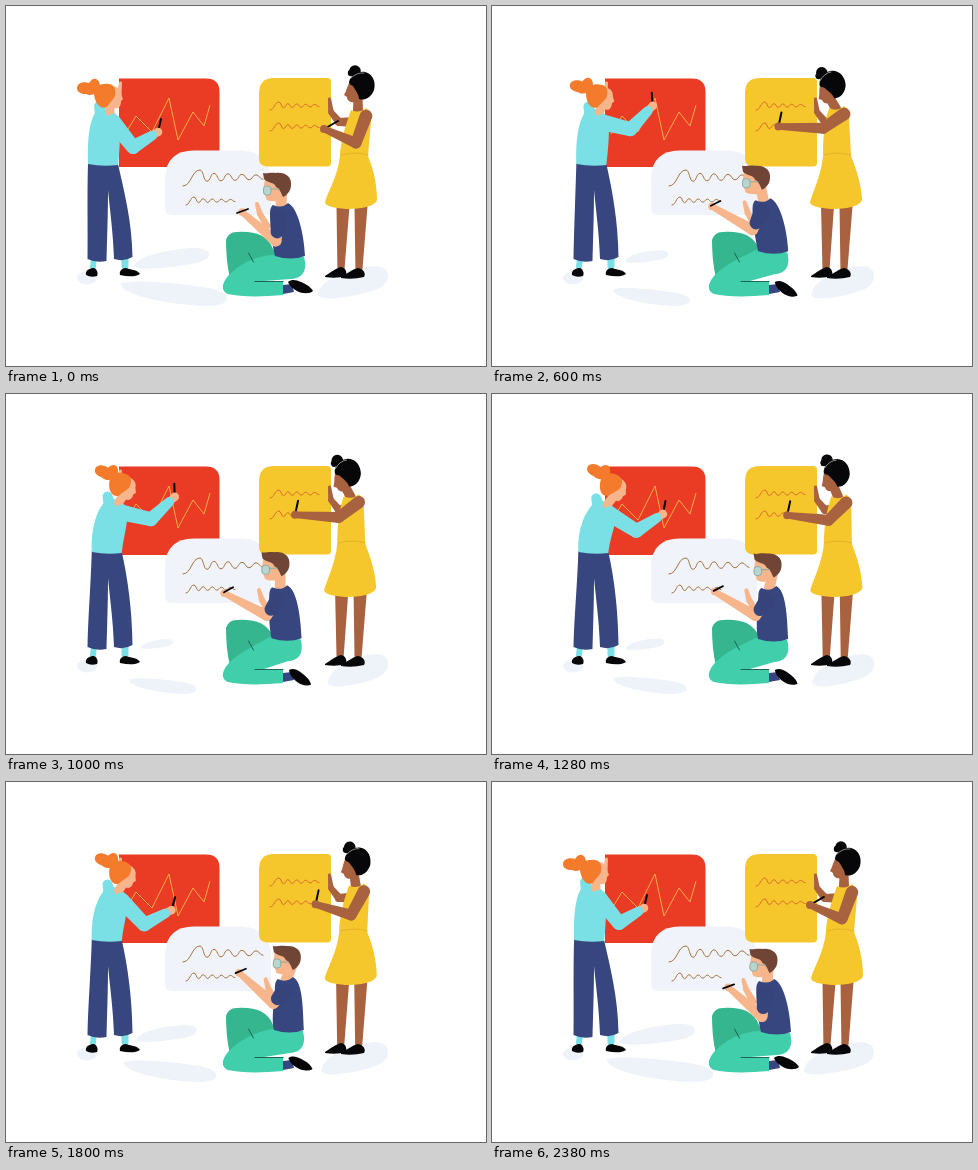
Write an HTML page that moves like this. It is 480x360 px and loops after 2400 ms.

```html
<!DOCTYPE html>
<html lang="en">
<head>
<meta charset="utf-8">
<title>Team at the boards</title>
<style>
html, body { margin: 0; width: 100%; height: 100%; overflow: hidden; background: #fff; }
svg { display: block; width: 480px; height: 360px; }
</style>
</head>
<body>
<svg viewBox="0 0 480 360" width="480" height="360">
  <g id="floor"></g>
  <path fill="#ea3b25" d="M113 72.500H200Q213.500 72.500 213.500 86V161H113Z"/>
  <path fill="#f0f4fa" d="M159 202V172Q160 144.500 188 144.500H237Q262 146 265 172V209H166Q159 209 159 202Z"/>
  <path fill="#f6c72c" d="M253 87Q253 72 268 72H321Q325 72 325 76V157Q325 160.500 321 160.500H261Q253 160 253 153Z"/>
  <path fill="none" stroke="#f3ae45" stroke-linejoin="round" d="M119 128L130 110L146 126L163 92L172 134L187 106L198 120L204 99"/>
  <g id="notes"></g>
  <g id="people"></g>
</svg>
<script>
const LOOP = 2400, STEP = 20;
const SKIN = '#f7b58c', BROWN = '#a8623f', NAVY = '#37467e', CYAN = '#7be0e6',
      GOLD = '#f6c72c', ORANGE = '#f47a2c', BLACK = '#070608', SHADE = '#eef2f9';

// eased 0 to 1 at the peak time, then back to 0 at the end of the loop
function swing(t, peak) {
  const u = t < peak ? t / peak : (LOOP - t) / (LOOP - peak);
  return (1 - Math.cos(Math.PI * u)) / 2;
}
const angle = t => 2 * Math.PI * t / LOOP;

const num = v => +v.toFixed(2);
const off = (p, x, y) => [p[0] + x, p[1] + y];
const mix = (a, b, u) => [a[0] + (b[0] - a[0]) * u, a[1] + (b[1] - a[1]) * u];
const shape = (d, fill) => `<path d="${d}" fill="${fill}"/>`;
const stroke = (d, color, w) =>
  `<path d="${d}" fill="none" stroke="${color}" stroke-width="${w}" stroke-linecap="round"/>`;
const rod = (a, b, w = 2) => stroke(`M${a.map(num)}L${b.map(num)}`, BLACK, w);
const dot = (p, r, fill) => `<circle cx="${num(p[0])}" cy="${num(p[1])}" r="${r}" fill="${fill}"/>`;
const turn = (x, y, deg, cx, cy, body) =>
  `<g transform="translate(${num(x)} ${num(y)}) rotate(${num(deg)} ${cx} ${cy})">${body}</g>`;

// path text with points measured from an anchor
const rel = (o, x, y) => `${num(o[0] + x)} ${num(o[1] + y)}`;

// tapered capsule
function limb(a, ra, b, rb, fill) {
  const dx = b[0] - a[0], dy = b[1] - a[1], len = Math.hypot(dx, dy) || 1;
  const nx = -dy / len, ny = dx / len;
  return shape(`M${rel(a, nx * ra, ny * ra)}L${rel(b, nx * rb, ny * rb)}` +
    `A${rb} ${rb} 0 0 0 ${rel(b, -nx * rb, -ny * rb)}L${rel(a, -nx * ra, -ny * ra)}` +
    `A${ra} ${ra} 0 0 0 ${rel(a, nx * ra, ny * ra)}Z`, fill);
}

// handwriting: one tall stroke, then shrinking waves
function scribble(x, y, end, rise, height, waves, color) {
  const step = (end - x - rise) / waves, mid = y - height * .55;
  let d = `M${x} ${y}`, py = y;
  for (let i = 0; i <= waves; i++) {
    const w = i ? step : rise;
    const ny = i ? mid + (i % 2 ? 1 : -1) * height * .27 * (1 - .5 * i / waves) : y - height;
    d += `C${num(x + w / 2)} ${num(py)} ${num(x + w / 2)} ${num(ny)} ${num(x + w)} ${num(ny)}`;
    x += w;
    py = ny;
  }
  return stroke(d, color, 1);
}

function blob(x0, x1, y0, y1, rising) {
  const q = (x, y) => `${num(x0 + (x1 - x0) * x)} ${num(y0 + (y1 - y0) * (rising ? y : 1 - y))}`;
  return shape(`M${q(0, .9)}C${q(-.02, .5)} ${q(.4, .05)} ${q(.8, 0)}` +
    `C${q(1.06, 0)} ${q(1.06, .5)} ${q(.85, .7)}C${q(.6, .9)} ${q(.1, 1.1)} ${q(0, .9)}Z`, SHADE);
}

function drawFloor(t) {
  const k = swing(t, 900);
  return `<ellipse cx="81" cy="272" rx="10" ry="6.500" fill="${SHADE}"/>` +
    blob(128 + 7 * k, 203 - 36 * k, 242 + 3 * k, 263 - 8 * k, true) +
    blob(115 + 8 * k, 221 - 31 * k, 275 + 9 * k, 300, false) +
    blob(312 + 10 * k, 382, 260, 293, true);
}

function drawPainter(t) {
  const s = swing(t, 1500) ** 1.2;
  const lift = t < 1560 ? Math.sin(Math.PI * t / 1560) ** 2 : 0;
  const h = [101 + 20 * s, 91 + 2 * s], c = [98 + 12 * s, 105 + 5 * s * s];
  const e = [127 + 16 * s + 8 * lift, 141 + 2 * s - 21 * lift];
  const hand = [152 + 19 * s + 4 * lift, 126 + 3 * s - 31 * lift];
  const wrist = mix(hand, e, .22), w = 4.5 * Math.sqrt(s);
  const l = num(82 + w), r = num(112 + w);
  return limb([88, 252], 3, [87, 261], 3, CYAN) + limb([119, 250], 3.5, [119, 260], 3.5, CYAN) +
    shape('M80 269C79 264 84 262 88 262C92 264 92 268 91 270Q85 272 80 269Z', BLACK) +
    shape('M114 269C113 265 116 262 120 262C126 264 132 264 134 268Q128 272 114 269Z', BLACK) +
    shape(`M${l} 157L${r} 158C${num(112 + w + 6)} 185 126 215 126.500 251Q118 256 108 253` +
      `C107 225 104 205 102 184C102 210 101 235 100.500 255Q90 257 81.500 253C82 225 ${num(81 + w)} 190 ${l} 157Z`, NAVY) +
    limb([113, 90], 2.5, [114.5, 77], 1.5, SKIN) +
    limb(off(c, -3, 3), 6, off(c, -5, -5), 5, CYAN) +
    shape(`M${rel(c, -6, -2)}C${rel(c, -14, 6)} ${num(81 + w)} 130 ${l} 158Q${num(97 + w)} 161 ${r} 159` +
      `C${num(114 + w)} 140 ${rel(c, 17, 18)} ${rel(c, 14, 6)}C${rel(c, 10, 0)} ${rel(c, 4, -4)} ${rel(c, -6, -2)}Z`, CYAN) +
    limb(off(h, 3, 8), 4.5, off(c, 6, 1), 4.5, SKIN) +
    turn(h[0] - 101, h[1] - 91, 24 * s, 101, 91,
      shape('M103 80C110 79 115 83 115 88L117 93L115 95C115 100 113 103 109 102C104 101 99 95 100 88Z', SKIN) +
      shape('M88 88C88 80 96 77 103 78C109 79 110 84 109 90C107 94 104 96 101 101C94 104 89 97 88 88Z', ORANGE) +
      shape('M71 82C71 77 78 75 83 77C87 70 93 72 94 79L95 86C89 86 87 91 80 88C75 88 71 86 71 82Z', ORANGE)) +
    rod(hand, off(hand, 3 - 5 * lift + s, -13)) +
    limb(wrist, 3.5, hand, 4.3, SKIN) +
    limb(off(c, 9, 11), 8, e, 7, CYAN) + limb(e, 7, wrist, 4.8, CYAN);
}

function drawWriter(t) {
  const s = swing(t, 650), flick = Math.max(0, Math.cos(angle(t))) ** 3;
  const h = [356 - 15.5 * s, 79 - s], c = [354 - 8 * s, 103 - 2 * s];
  const e = [350 - 19 * s, 137 - 15 * s], hand = [318 - 32 * s, 123 - 2.5 * s];
  const x = v => num(v - 3 * s), f = v => num(v - s);
  return limb([337 - 1.5 * s, 200], 6.5, [335 - s, 262], 3.6, BROWN) +
    limb([355 - s, 200], 6.5, [353 - s, 262], 3.6, BROWN) +
    shape('M319 270C324 267 330 262 335 261C340 262 341 266 340 270Q330 273 319 271Z', BLACK) +
    shape('M335 271C342 267 347 263 352 262C358 263 360 268 358 271Q346 274 335 272Z', BLACK) +
    limb([323.5, 93], 1.6, [325, 106], 2.8, BROWN) + limb([325, 106], 3, [333, 116], 4, BROWN) +
    limb([333, 116], 4, off(c, -6, 13), 5, BROWN) +
    limb(off(h, -4, 12), 4.5, off(c, -2, 2), 5, BROWN) +
    shape(`M${rel(c, -9, 1)}Q${rel(c, -1, 5)} ${rel(c, 6, -1)}Q${rel(c, 11, 2)} ${rel(c, 11, 12)}L${x(362)} 150` +
      `C${x(370)} 170 ${f(371)} 185 ${f(371)} 194C${f(368)} 202 ${f(350)} 203 ${f(340)} 203` +
      `C${f(328)} 202 ${f(319)} 200 ${f(319)} 196C${f(322)} 185 ${x(332)} 170 ${x(334)} 150` +
      `C${x(334)} 138 ${rel(c, -15, 18)} ${rel(c, -9, 1)}Z`, GOLD) +
    stroke(`M${x(335)} 149Q${x(348)} 145 ${x(362)} 149`, '#e3ad25', .8) +
    turn(h[0] - 356, h[1] - 79, -18 * s, 356, 79,
      shape('M346 72C342 78 341 82 340 85L338 89L341 91C341 95 345 97 349 96C355 95 358 90 358 84Z', BROWN) +
      dot([349, 65], 5.8, BLACK) + dot([345, 67], 3.2, BLACK) +
      shape('M343 76C345 68 353 65 359 66C367 68 370 76 368 84C365 92 358 95 353 93C353 88 349 84 347 80C345 79 343 78 343 76Z', BLACK) +
      stroke('M345 72Q351 66 358 67', '#bdb3ac', .7)) +
    rod(hand, off(hand, 3 + 11 * flick, -14 + 6 * flick)) +
    limb(off(c, 6, 7), 6.3, e, 5.5, BROWN) + limb(e, 5.5, hand, 3.2, BROWN) + dot(hand, 4, BROWN);
}

function drawSitter(t) {
  const up = swing(t, 850), sway = -Math.sin(angle(t)), back = Math.max(0, sway);
  const head = [8.4 * sway + 2.8 * swing(t, LOOP / 2), -9 * up];
  const c = [276 + head[0] / 2, 200 - 6 * up], hip = [-3.5 * up, -6 * up];
  const e = [270 - 8 * up + 3 * sway - 3 * back, 235 - 14 * up - 9 * back];
  const hand = [236 - 17 * up + 2.5 * sway, 206 - 7 * up - 13 * back];
  const palm = [253 + 2 * up + 8 * back, 206 - 2 * up];
  const p = (x, y) => rel(hip, x, y), shoulder = off(c, -3, 11);
  return shape(`M220 234Q223 225 232 226C248 225 262 229 267 243L${p(272, 252)}L245 262L224 272C221 260 220 246 220 234Z`, '#36b68e') +
    shape('M277 279L286 278L288 286L277 288Z', NAVY) +
    turn(0, 0, 14 * up, 283, 280,
      shape('M282 276C286 273 290 274 295 276C300 278 305 281 307 285C304 288 296 288 291 285C288 283 284 281 282 276Z', BLACK)) +
    shape(`M${p(266, 249)}L${p(298, 251)}C${p(301, 262)} ${p(299, 272)} ${p(285, 273)}L258 275L277 275.500V289` +
      `C255 291 235 291 222 288C213 284 217 274 226 266C240 254 253 250 ${p(266, 249)}Z`, '#40ceab') +
    stroke('M242.500 247L247.500 256', '#17594c', .9) + stroke('M249 275.500H277', '#17594c', .9) +
    limb(off(palm, -2, -8), 2, off(palm, 1, 2), 3, SKIN) + limb(off(palm, 1, 2), 3, off(palm, 8, 14), 3.5, SKIN) +
    limb([276 + head[0], 188 + head[1]], 5, off(c, -1, 0), 5.5, SKIN) +
    shape(`M${rel(c, -9, -1)}Q${rel(c, 0, 3)} ${rel(c, 6, -3)}C${rel(c, 16, 2)} ${p(298, 228)} ${p(299, 250)}` +
      `Q${p(285, 255)} ${p(269, 250)}C${p(266, 238)} ${rel(c, -12, 20)} ${rel(c, -12, 8)}Q${rel(c, -12, 1)} ${rel(c, -9, -1)}Z`, NAVY) +
    turn(...head, 0, 0, 0,
      shape('M259 173C258 180 257 184 257 187C260 188 259 191 261 194C265 196 270 195 273 196C278 194 280 186 277 178L272 174Z', SKIN) +
      shape('M257 167C261 168 264 166 270 167C279 166 286 171 285 179C285 185 281 189 277 191C275 187 274 183 270 181C269 176 261 177 258 173Z', '#704536') +
      '<rect x="257.500" y="180" width="7.500" height="9" rx="3" fill="#b8d5cf" stroke="#7fa9a4" stroke-width=".8"/>' +
      stroke('M265 183L273 183', '#7fa9a4', .9)) +
    limb(shoulder, 5, e, 5.5, SKIN) + limb(e, 5.5, hand, 3, SKIN) + dot(hand, 3.7, SKIN) +
    limb(shoulder, 8, mix(shoulder, e, .62), 6.5, '#36447b') +
    rod(off(hand, -5 + 5 * up, 1 - 2 * up), off(hand, 6 + 3 * up, -3 - 3 * up), 1.8);
}

const layer = id => document.getElementById(id);
const floor = layer('floor'), people = layer('people');
layer('notes').innerHTML =
  scribble(177, 180, 257, 17, 16, 9, '#a5733f') + scribble(180, 199, 229, 8, 8, 9, '#a5733f') +
  scribble(264, 104, 313, 9, 8, 9, '#dd6a2b') + scribble(264, 125, 313, 9, 8, 9, '#dd6a2b');

const start = performance.now();
function frame() {
  const t = Math.floor((performance.now() - start) % LOOP / STEP) * STEP;
  floor.innerHTML = drawFloor(t);
  people.innerHTML = drawPainter(t) + drawWriter(t) + drawSitter(t);
  requestAnimationFrame(frame);
}
frame();
</script>
</body>
</html>
```
